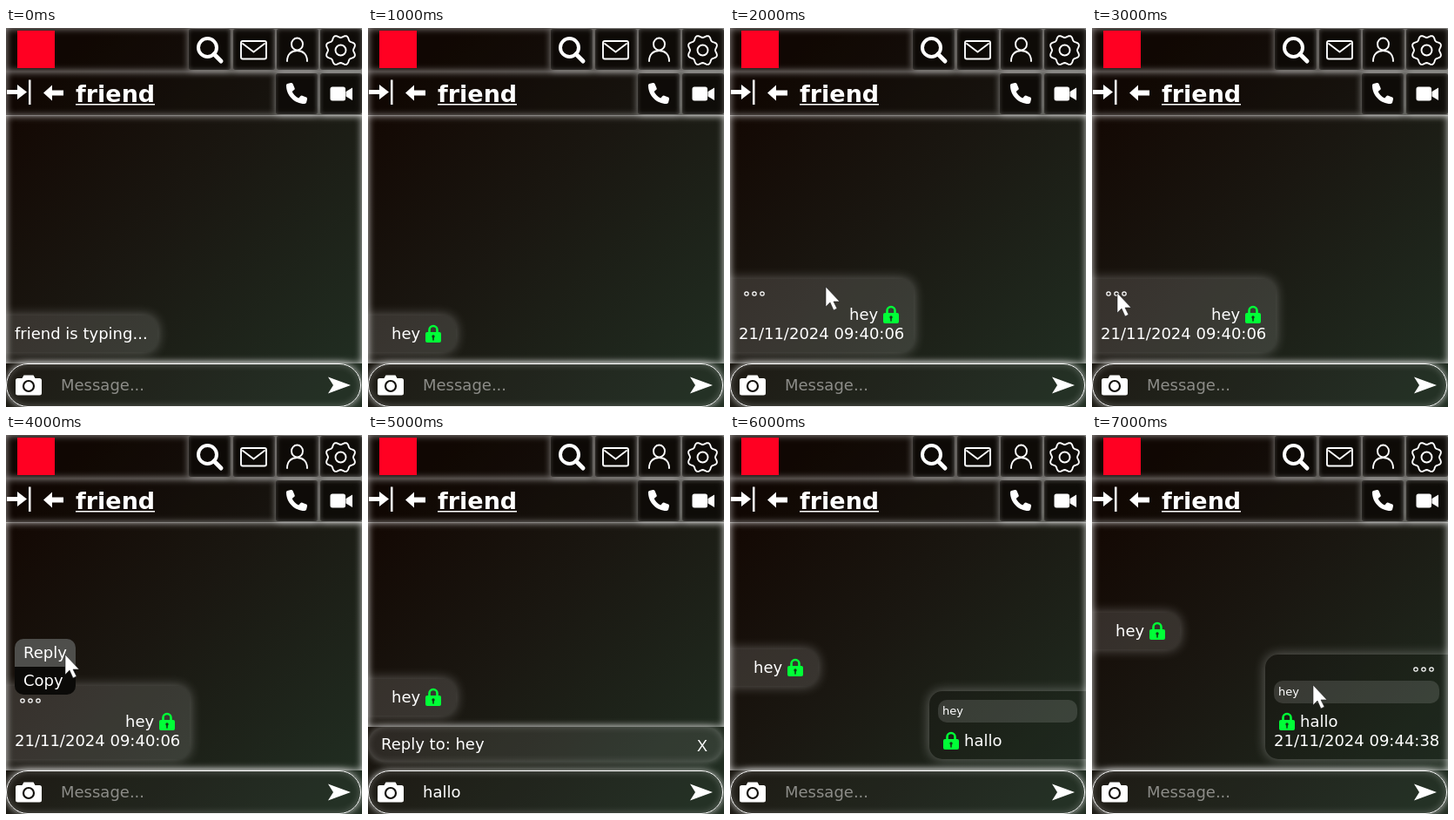
An HTML page for the animation above (8000 ms loop, 409 by 435 pixels).

```html
<!DOCTYPE html>
<html lang="en">
<head>
<meta charset="utf-8">
<title>Chat reply</title>
<style>
html, body { margin: 0; width: 100%; height: 100%; overflow: hidden; background: #140b07; }
#stage { position: relative; width: 409px; height: 435px; overflow: hidden;
  background: linear-gradient(135deg, #130803 12%, #1a1711 48%, #212e22 95%); }
#stage div, svg { position: absolute; box-sizing: border-box; }
svg { left: 0; top: 0; width: 409px; height: 435px; }
text { font: 18px "DejaVu Sans", sans-serif; fill: #fff; white-space: pre; }
.title { font-size: 27px; font-weight: bold; }
.small { font-size: 13px; }
.hint { fill: #8c8c88; }
.close { font-family: "Liberation Sans", sans-serif; }
.line { fill: none; stroke: #fff; stroke-width: 1.9; stroke-linejoin: round; stroke-linecap: round; }
.bar { background: #0002; box-shadow: inset 0 0 8px #fff9; }
.button { background: #0b0805b0; border-radius: 3px; box-shadow: 0 0 8px #fff8, inset 0 0 5px #fff3; }
.chat { box-shadow: inset 0 0 9px #fffc; }
.input { border: 1px solid #fff; border-radius: 25px; background: #ffffff04;
  box-shadow: inset 0 0 8px #fff4, 0 0 9px #fffb; }
.bubble { border-radius: 15px; box-shadow: 0 0 14px #fff5; }
.theirs { background: #ffffff22; }
.mine { background: #00000010; }
.quote { border-radius: 10px; background: #ffffff22; }
.reply { border-radius: 20px; background: #ffffff16; box-shadow: inset 0 0 9px #fff3, 0 0 8px #fff5; }
.pick { background: #4e4e4b; border-radius: 10px 10px 0 0; }
.copy { background: #0b0a08; border-radius: 0 0 10px 10px; }
</style>
</head>
<body>
<div id="stage">
  <div id="boxes" style="inset:0"></div>
  <svg id="icons" fill="#fff"></svg>
  <svg id="scene" fill="#fff"></svg>
</div>
<script>
const byId = id => document.getElementById(id);
const box = (cls, x, y, w, h) =>
  `<div class="${cls}" style="left:${x}px;top:${y}px;width:${w}px;height:${h}px"></div>`;
const text = (x, y, str, cls = '') => `<text class="${cls}" x="${x}" y="${y}">${str}</text>`;
const path = (d, attrs = '') => `<path d="${d}" ${attrs}/>`;
const line = d => path(d, 'class="line"');
const circle = (x, y, r, attrs = '') => `<circle cx="${x}" cy="${y}" r="${r}" ${attrs}/>`;

const lock = (x, y) => `<g transform="translate(${x} ${y})">
  <rect y="8" width="18" height="12" rx="2" fill="#00ff37"/>
  <path d="M4.500 9V5.500a4.500 4.500 0 0 1 9 0V9" fill="none" stroke="#00ff37" stroke-width="2.600"/>
  <path d="M9 14v3" stroke="#143518" stroke-width="1.600" stroke-linecap="round"/>
  <circle cx="9" cy="13" r="1.700" fill="#143518"/></g>`;
const dots = (x, y) => [0, 9, 18].map(dx =>
  circle(x + dx, y, 2.2, 'fill="none" stroke="#fff" stroke-width="1.2"')).join('');
const cursor = (x, y) => path(`M${x} ${y}v23l5-5 4 9 4-2-4-8h7z`, 'stroke="#222" stroke-width=".6"');

// A scene is made of boxes (HTML) and marks (SVG)
const join = (...parts) => ({
  boxes: parts.map(p => p.boxes || '').join(''),
  marks: parts.map(p => p.marks || '').join('')
});
const received = y => ({
  boxes: box('bubble theirs', -15, y, 116, 42),
  marks: text(27, y + 27, 'hey') + lock(66, y + 11)
});
const receivedOpen = {
  boxes: box('bubble theirs', -15, 288, 226, 84),
  marks: dots(19, 305) + text(137, 335, 'hey') + lock(176, 319) + text(10, 357, '21/11/2024 09:40:06')
};
const sent = (x, y, quoteY, base) => ({
  boxes: box('bubble mine', x, y, 425 - x, 372 - y) + box('quote', x + 10, quoteY, 389 - x, 26),
  marks: text(x + 15, quoteY + 17, 'hey', 'small') + lock(x + 16, base - 16) + text(x + 40, base, 'hallo')
});
const pointer = (x, y) => ({ marks: cursor(x, y) });
const menu = {
  boxes: box('pick', 10, 234, 70, 32) + box('copy', 10, 266, 70, 32),
  marks: text(20, 256, 'Reply') + text(20, 288, 'Copy')
};
const replyBar = {
  boxes: box('reply', 0, 335, 408, 40),
  marks: text(15, 361, 'Reply to: hey') + text(378, 363, 'X', 'close')
};
const typing = {
  boxes: box('bubble theirs', -15, 330, 189, 42),
  marks: text(10, 357, 'friend is typing...')
};
const sentTime = { marks: dots(372, 269) + text(209, 357, '21/11/2024 09:44:38') };

const scenes = [
  typing,
  received(330),
  join(receivedOpen, pointer(110, 297)),
  join(receivedOpen, pointer(29, 304)),
  join(receivedOpen, menu, pointer(68, 252)),
  join(received(280), replyBar),
  join(received(246), sent(229, 294, 304, 357)),
  join(received(204), sent(199, 252, 282, 335), sentTime, pointer(254, 287))
];
const REPLYING = 5;

const frameBoxes = bottom =>
  box('chat', 0, 100, 409, bottom - 100) +
  box('bar', 0, 0, 409, 50) + box('bar', 0, 50, 409, 51) +
  [[210, 1], [261, 1], [311, 1], [361, 1], [310, 52], [361, 52]]
    .map(([x, y]) => box('button', x, y, 48, 47)).join('');

const gear = Array.from({ length: 97 }, (_, i) => {
  const a = i * Math.PI / 48, r = 16 - 1.5 * Math.cos(8 * a);
  return `${(384.5 + r * Math.cos(a)).toFixed(1)} ${(25.5 + r * Math.sin(a)).toFixed(1)}`;
}).join('L');

byId('icons').innerHTML =
  '<rect x="13" y="3" width="43" height="43" fill="#ff0022"/>' +
  circle(231.5, 22.5, 10.5, 'fill="none" stroke="#fff" stroke-width="4"') +
  path('M239 30l8 8', 'stroke="#fff" stroke-width="5" stroke-linecap="round"') +
  '<rect class="line" x="270" y="15" width="29" height="20.500" rx="2"/>' +
  line('M272 18l12.5 9.5L297 18') +
  '<ellipse class="line" cx="334.5" cy="18.5" rx="6.5" ry="7"/>' +
  line('M323 38c0-8 5-12 11.500-12s11.500 4 11.500 12') +
  line(`M${gear}z`) + circle(384.5, 25.5, 6, 'class="line"') +
  path('M1 71h12v-6l11 8.500-11 8.500v-6H1zM26 59.500h2.500v28.500H26z') +
  path('M43 74.500l10-9v6h13v6H53v6z') +
  text(80, 85, 'friend', 'title') + path('M80 87h91v1.500H80z') +
  path('M329.500 64c-.5-1-1.500-1.300-2.300-1l-4 1c-.8.3-1.200 1-1.200 2 0 11.500 9.500 21 21 21 1 0 1.700-.5 2-1.200l1-4c.2-1-.2-1.800-1-2.200l-4.600-1.900c-.8-.3-1.600-.1-2.200.6l-1.900 2.300a16 16 0 0 1-7.600-7.600l2.300-1.900c.7-.6.900-1.400.6-2.200z') +
  '<rect x="372.500" y="67.500" width="17.500" height="16" rx="2.500"/>' +
  path('M390.500 73l7.500-4.500v14.500l-7.500-4.500z') +
  path('M13.500 402h5l2-3.500h11l2 3.500h5q2.500 0 2.500 2.500v14.500q0 2.500-2.500 2.500h-25q-2.500 0-2.500-2.500v-14.500q0-2.500 2.500-2.500z') +
  circle(26, 411, 6, 'fill="none" stroke="#12100c" stroke-width="2.200"') +
  path('M370 400.500l26 9.500-26 9.500 6-9.500z');

let shown = -1;
function draw(now) {
  const index = Math.floor(now % 8000 / 1000);
  if (index !== shown) {
    shown = index;
    const { boxes, marks } = scenes[index], replying = index === REPLYING;
    byId('boxes').innerHTML = frameBoxes(replying ? 335 : 385) + boxes + box('input', 0, 385, 408, 49.5);
    byId('scene').innerHTML = marks +
      (replying ? text(63, 416, 'hallo') : text(63, 416, 'Message...', 'hint'));
  }
  requestAnimationFrame(draw);
}
draw(performance.now());
</script>
</body>
</html>
```
